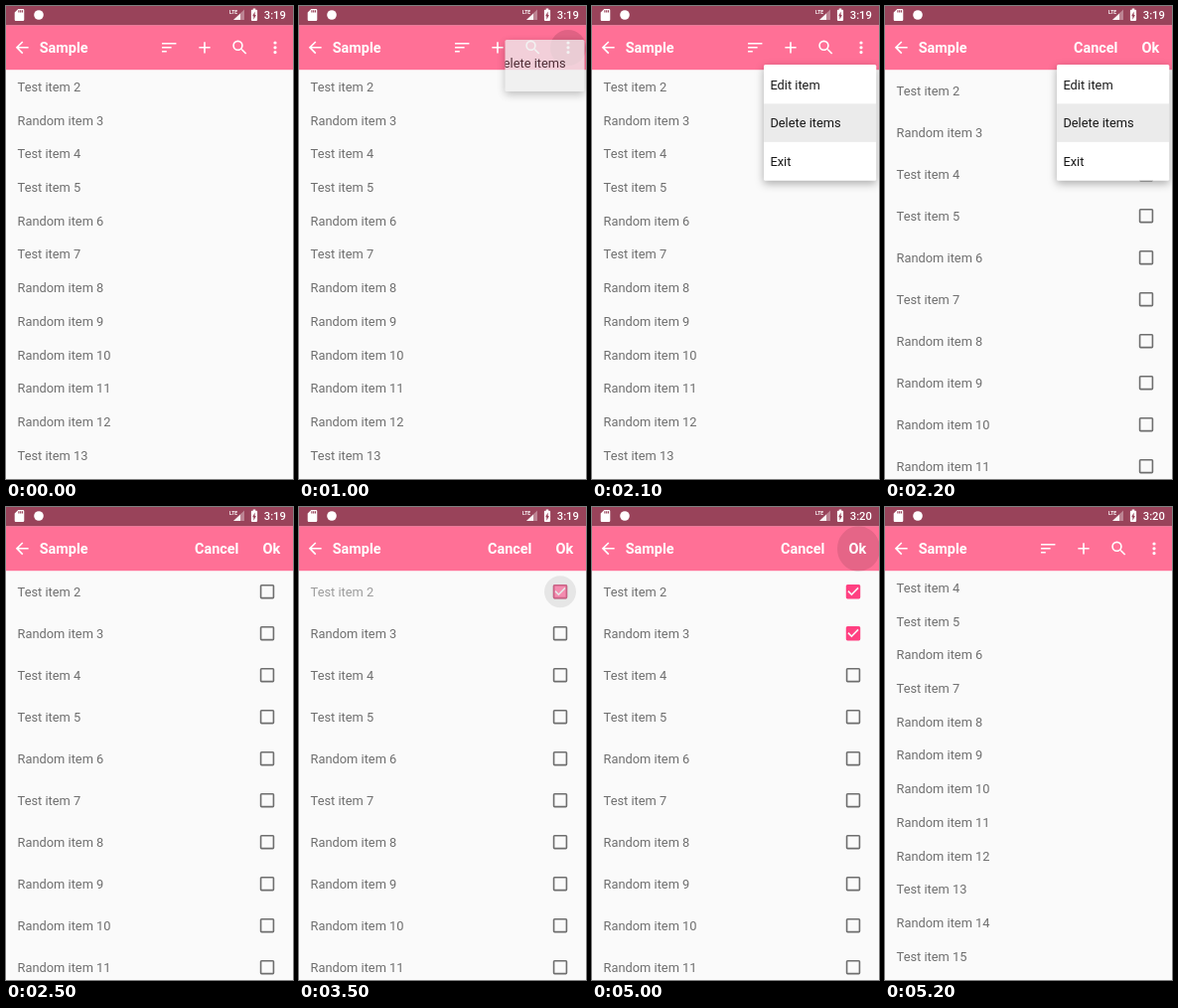
An HTML page that plays this animation: 289x476 px, repeating every 7800 ms.

```html
<!DOCTYPE html>
<html lang="en">
<head>
<meta charset="utf-8">
<title>Sample list</title>
<style>
  html, body { margin: 0; width: 100%; height: 100%; overflow: hidden; background: #fafafa; }
  svg { display: block; width: 100vw; height: 100vh; }
  text { font: 12.84px Roboto, sans-serif; white-space: pre; }
  .bar { font-size: 14.45px; font-weight: 700; fill: #fff; }
  .clock { font-size: 11.2px; font-weight: 500; fill: #fff; }
  .net { font-size: 5px; font-weight: 700; fill: #fff; }
  .item { fill: #000; fill-opacity: .56; }
  .menu { fill: #000; fill-opacity: .9; }
  .card { filter: drop-shadow(0 3px 4px rgba(0, 0, 0, .32)); }
</style>
</head>
<body>
<svg id="stage" viewBox="0 0 289 476"></svg>
<script>
const LOOP = 7800, DP = 0.8028;
const PINK = '#ff7096', DARK = '#99435a', ACCENT = '#ff4081';
const TESTS = [2, 4, 5, 7, 13, 15];
const ICON = {
  back: 'M20 11H7.83l5.59-5.59L12 4l-8 8 8 8 1.41-1.41L7.83 13H20z',
  sort: 'M3 18h6v-2H3zM3 6v2h18V6zm0 7h12v-2H3z',
  add: 'M19 13h-6v6h-2v-6H5v-2h6V5h2v6h6z',
  search: 'M15.5 14h-.79l-.28-.27A6.47 6.47 0 0 0 16 9.5 6.5 6.5 0 1 0 9.5 16c1.61 0 3.09-.59 4.23-1.57l.27.28v.79l5 4.99L20.49 19zm-6 0a4.5 4.5 0 1 1 0-9 4.5 4.5 0 0 1 0 9z',
  more: 'M12 8a2 2 0 1 0 0-4 2 2 0 0 0 0 4zm0 2a2 2 0 1 0 0 4 2 2 0 0 0 0-4zm0 6a2 2 0 1 0 0 4 2 2 0 0 0 0-4z',
  empty: 'M19 5v14H5V5zm0-2H5a2 2 0 0 0-2 2v14a2 2 0 0 0 2 2h14a2 2 0 0 0 2-2V5a2 2 0 0 0-2-2z',
  checked: 'M19 3H5a2 2 0 0 0-2 2v14a2 2 0 0 0 2 2h14a2 2 0 0 0 2-2V5a2 2 0 0 0-2-2zm-9 14l-5-5 1.41-1.41L10 14.17l7.59-7.59L19 8z',
  card: 'M18 2h-8L4 8v12a2 2 0 0 0 2 2h12a2 2 0 0 0 2-2V4a2 2 0 0 0-2-2zm-6 6h-2V4h2zm3 0h-2V4h2zm3 0h-2V4h2z',
  battery: 'M15.67 4H14V2h-4v2H8.33C7.6 4 7 4.6 7 5.33v15.34C7 21.4 7.6 22 8.33 22h7.34c.73 0 1.33-.6 1.33-1.33V5.33C17 4.6 16.4 4 15.67 4zM11 20v-5.5H9L13 7v5.5h2z'
};

const lerp = (a, b, k) => a + (b - a) * k;
const text = (x, y, s, cls, alpha = 1) =>
  `<text x="${x}" y="${y}" class="${cls}" opacity="${alpha}">${s}</text>`;
const rect = (x, y, w, h, fill, more = '') =>
  `<rect x="${x}" y="${y}" width="${w}" height="${h}" fill="${fill}" ${more}/>`;
const disc = (x, y, r, fill, alpha = 1) =>
  `<circle cx="${x}" cy="${y}" r="${r}" fill="${fill}" opacity="${alpha}"/>`;
const icon = (name, x, y, fill = '#fff', alpha = 1, size = DP) =>
  `<path d="${ICON[name]}" fill="${fill}" opacity="${alpha}" fill-rule="evenodd"
    transform="translate(${x} ${y}) scale(${size}) translate(-12 -12)"/>`;
// Value for each 100 ms step since start; the last one holds.
const steps = (t, start, values) =>
  values[Math.min(values.length - 1, Math.floor((t - start) / 100))];

function statusBar(t) {
  return rect(0, 0, 289, 19.2, DARK) +
    icon('card', 13.5, 9, '#fff', 1, .6) + disc(33, 9, 4.8, '#fff') +
    text(225, 7.5, 'LTE', 'net') +
    '<path d="M240 3.5V14H229z" fill="#fff" opacity=".35"/>' +
    '<path d="M236 7.5V14H229z" fill="#fff" opacity=".9"/>' +
    icon('battery', 250, 8.7, '#fff', 1, .62) +
    text(259.8, 13, t < 4600 ? '3:19' : '3:20', 'clock');
}

function header(t, choosing) {
  let out = rect(0, 19.2, 289, 45, PINK) + icon('back', 16.2, 41.8) + text(33.7, 47, 'Sample', 'bar');
  if (choosing) {
    if (t >= 5000) out += '<path d="M247 42a21.5 22.5 0 0 1 42-7v14a21.5 22.5 0 0 1-42-7z" opacity=".1"/>';
    return out + text(190, 47, 'Cancel', 'bar') + text(258.6, 47, 'Ok', 'bar');
  }
  if (t >= 1000 && t < 1300) out += disc(271, 42, 18, '#000', steps(t, 1000, [.12, .08, .03]));
  return out + icon('sort', 164.2, 41.8) + icon('add', 200, 41.8) +
    icon('search', 235.5, 41.8) + icon('more', 271, 41.8);
}

function checkbox(y, t, start, ripple) {
  if (t < start) return icon('empty', 263, y, '#000', .56);
  const k = t < start + 100 ? .55 : 1;
  return disc(263, y, 16, '#000', steps(t, start, ripple)) +
    (k < 1 ? icon('empty', 263, y, '#000', .4) : '') + icon('checked', 263, y, ACCENT, k);
}

function list(t, choosing) {
  const first = t >= 5200 ? 4 : 2, pitch = choosing ? 42 : 33.7;
  const checks = [[3500, [.08, .06, .03, 0]], [4000, [.08, 0]]];
  let out = '';
  for (let i = 0; i < (choosing ? 10 : 12); i++) {
    const n = first + i, y = (choosing ? 85.2 : 81.3) + pitch * i;
    const [start, ripple] = checks[i] || [Infinity, [0]];
    const fading = choosing && t >= start && t < start + 100;
    out += text(11.6, y + 4.6, `${TESTS.includes(n) ? 'Test' : 'Random'} item ${n}`, 'item', fading ? .68 : 1);
    if (choosing) out += checkbox(y, t, start, ripple);
  }
  return out;
}

function popup(t) {
  if (t < 1000 || t >= 2500) return '';
  const k = steps(t, 1000, [0, .7, .95, 1]);
  const alpha = t < 2300 ? steps(t, 1000, [.76, 1]) : steps(t, 2300, [.6, .2]);
  const x = lerp(207.5, 173, k), y = lerp(34, 59, k), w = lerp(80, 113.3, k), h = lerp(52, 116.8, k);
  const press = t < 2000 ? 0 : steps(t, 2000, [.04, .08]);
  const rows = ['Edit item', 'Delete items', 'Exit'];
  return `<clipPath id="reveal">${rect(x, y, w, h, '#000')}</clipPath><g opacity="${alpha}">` +
    rect(x, y, w, h, k ? '#fff' : '#eee', 'rx="1.6" class="card"') +
    `<g clip-path="url(#reveal)"><g transform="translate(${lerp(18, 0, k)} ${lerp(-60, 0, k)})">` +
    rect(173, 98.3, 113.3, 38.6, '#000', `opacity="${press}"`) +
    rows.map((s, i) => text(179.4, 83.6 + 38.8 * i, s, 'menu')).join('') + '</g></g></g>';
}

function scene(t) {
  const choosing = t >= 2200 && t < 5200;
  return rect(0, 0, 289, 476, '#fafafa') + list(t, choosing) + header(t, choosing) + statusBar(t) + popup(t);
}

const stage = document.getElementById('stage');
const begin = performance.now();
let shown = -1;
function tick() {
  const t = Math.floor((performance.now() - begin) % LOOP / 100) * 100;
  if (t !== shown) stage.innerHTML = scene(shown = t);
  requestAnimationFrame(tick);
}
tick();
</script>
</body>
</html>
```
